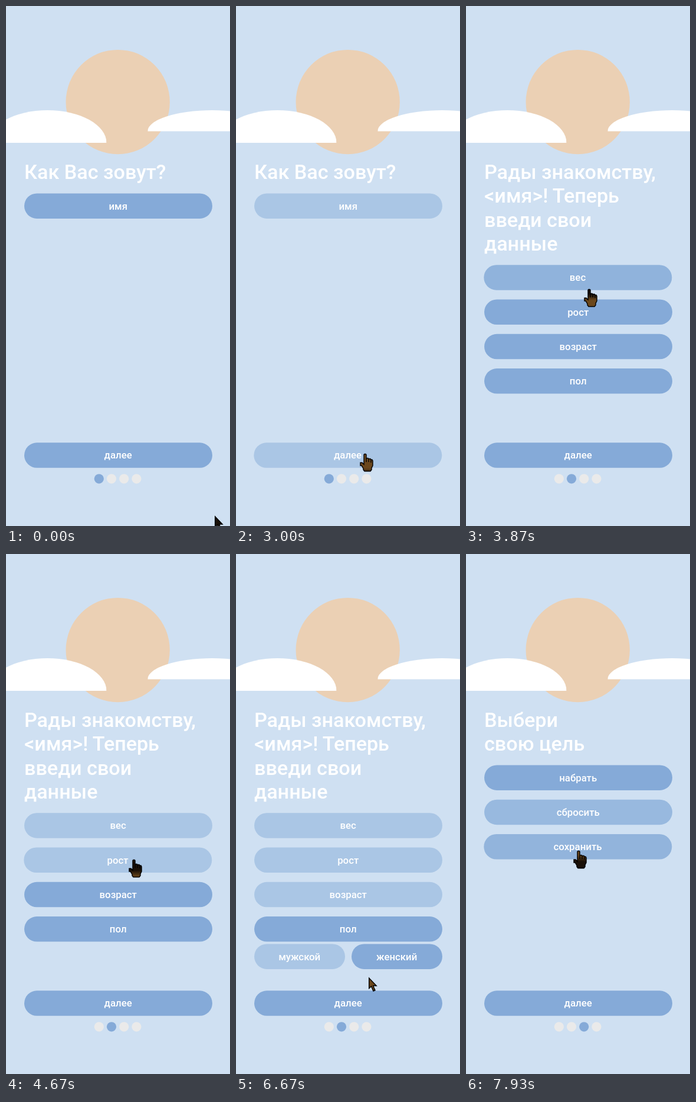
Animation, 380 px wide and 878 px high, one loop 8 s. Source, as an HTML page:

```html
<!DOCTYPE html>
<html lang="ru">
<head>
<meta charset="utf-8">
<style>
html, body { margin: 0; width: 100%; height: 100%; overflow: hidden; background: #cfe0f2; }
svg { display: block; }
text { font: 500 16.8px Roboto, sans-serif; fill: #fff; }
.title { font-size: 34.1px; }
</style>
</head>
<body>
<svg id="stage" width="380" height="878">
  <circle cx="189.7" cy="162.1" r="88.2" fill="#ebd0b4"/>
  <ellipse cx="70.3" cy="231" rx="100.2" ry="55" fill="#fff" clip-path="inset(0 0 50% 0)"/>
  <ellipse cx="350" cy="211.4" rx="109.7" ry="35.3" fill="#fff" clip-path="inset(0 0 50% 0)"/>
</svg>
<script>
const LOOP = 8000, STEP = 1000 / 15, HOLD = 130, HEIGHT = 42.5, ROW = 58.3;
const DARK = [133, 170, 216], LIGHT = [170, 198, 229];
const stage = document.getElementById('stage');

function add(parent, tag, attrs, text) {
  const el = document.createElementNS('http://www.w3.org/2000/svg', tag);
  for (const k in attrs) el.setAttribute(k, attrs[k]);
  if (text) el.textContent = text;
  parent.append(el);
  return el;
}
const set = (el, k, v) => el.setAttribute(k, v);
const clamp = u => Math.min(1, Math.max(0, u));
const smooth = u => u * u * (3 - 2 * u);
const easeOut = (t, start, dur = 300) => 1 - (1 - clamp((t - start) / dur)) ** 1.75;
const mix = (a, b, u) => a + (b - a) * u;

// Values at time t in a list of [time, ...values], resting for `hold` at each
function track(keys, t, hold = 0, ease = u => u) {
  const i = Math.max(1, keys.findIndex(k => k[0] > t));
  const [t0, ...a] = keys[i - 1], [t1, ...b] = keys[i];
  const start = t0 + Math.min(hold, (t1 - t0) / 3);
  const u = ease(clamp((t - start) / (t1 - start)));
  return a.map((v, n) => mix(v, b[n], u));
}

const titles = [
  ['Как Вас зовут?'],
  ['Рады знакомству,', '<имя>! Теперь', 'введи свои', 'данные'],
  ['Выбери', 'свою цель']
];
const pages = titles.map(lines => {
  const g = add(stage, 'g', {});
  lines.forEach((s, n) => add(g, 'text', { class: 'title', x: 31, y: 291.7 + 40.5 * n }, s));
  return g;
});

// `toggles` are the times at which a button turns light, dark, light...
const buttons = [];
function button(label, page, y, toggles = [], x = 31, w = 319) {
  const g = add(stage, 'g', {});
  const rect = add(g, 'rect', { x, y, width: w, height: HEIGHT, rx: HEIGHT / 2 });
  add(g, 'text', { x: x + w / 2 - .3, y: y + 27.1, 'text-anchor': 'middle' }, label);
  buttons.push({ g, rect, page, x, y, w, toggles });
}
const SEX = 4, ALWAYS = 3;
const rows = (page, y, list) => list.forEach(([label, ...toggles], i) =>
  button(label, page, y + ROW * i, toggles));
rows(0, 316.4, [['имя', 1560]]);
rows(1, 437.2, [['вес', 3810], ['рост', 4350], ['возраст', 4750], ['пол', 5250, 5735]]);
button('мужской', SEX, 658.4, [-300], 31, 154);
button('женский', SEX, 658.4, [-300, 6250], 196, 154);
rows(2, 356.4, [['набрать'], ['сбросить', 7450, 7840], ['сохранить', 7870]]);
button('далее', ALWAYS, 737.3, [880, 1230, 2700, 3250, 6700, 7080]);

const dotX = i => 157.8 + 21.2 * i;
const dots = [1, 2, 3, 0].map(i =>
  add(stage, 'circle', { cx: dotX(i), cy: 798.3, r: 8.1, fill: i ? '#eaeaea' : '#85aad8' }));

// Cursor with a dark band drifting over brown
const grad = add(stage, 'linearGradient', { id: 'skin', gradientUnits: 'userSpaceOnUse', x1: 0, x2: 0 });
['#6b471c', '#191008', '#191008', '#6b471c'].forEach((c, i) =>
  add(grad, 'stop', { offset: [0, .3, .7, 1][i], 'stop-color': c }));
const cursor = add(stage, 'g', { stroke: '#000', 'stroke-width': 1.4, fill: 'url(#skin)' });
const arrow = add(cursor, 'path', { d: 'M.7 1V18.5L4.5 15 8 23 11 21.7 7.6 14H13.2Z' });
const hand = add(cursor, 'path', {
  d: 'M-1 1.5L0 .5H2L3 1.5V14V7.5H6L7 8.5V14V8.5H10L11 10V15V10H13L14 12V20L12 24V27L10 29.5H0' +
     'L-2 27V25L-5 20H-7V15H-4L-1 18Z'
});

const path = [
  [0, 354, 861], [200, 173, 484], [500, 173, 484], [1070, 190, 779], [1800, 191, 336],
  [2130, 204, 267], [2950, 218, 756], [3867, 208, 478], [4130, 206, 458], [4670, 216, 516],
  [5067, 225, 570], [5533, 242, 637], [5800, 242, 637], [6230, 258, 680], [6600, 225, 715],
  [6950, 195, 756], [7133, 195, 756], [7500, 190, 432], [7933, 190, 501], [LOOP, 190, 505]
];
const band = [[0, 8], [1800, 32], [3000, 42], [3867, 1], [7133, 42], [LOOP, 24]];

function draw(t) {
  const a = easeOut(t, 3030), b = easeOut(t, 6980), sex = easeOut(t, 5735, 180);
  const alpha = [1 - a, a * (1 - b), b, 1, sex * (1 - b)];
  const [x, y] = track(path, t, HOLD, smooth);
  const pressed = t > 5720 && t < 5880;
  let over = false;

  pages.forEach((g, i) => set(g, 'opacity', alpha[i]));
  for (const btn of buttons) {
    const light = btn.toggles.reduce((sum, s, i) => sum + easeOut(t, s) * (i % 2 ? -1 : 1), 0);
    const inside = !pressed && alpha[btn.page] > .3 &&
      x > btn.x && x < btn.x + btn.w && y > btn.y && y < btn.y + HEIGHT;
    over = over || inside;
    set(btn.g, 'opacity', alpha[btn.page]);
    set(btn.g, 'transform', `translate(${inside ? -.7 : 0} 0)`);
    set(btn.rect, 'fill', `rgb(${DARK.map((d, i) => Math.round(mix(d, LIGHT[i], light)))})`);
  }

  // The active dot trades places with its neighbours
  set(dots[3], 'cx', dotX(a + b));
  set(dots[0], 'cx', dotX(1 - a));
  set(dots[1], 'cx', dotX(2 - b));

  const [c] = track(band, t);
  set(grad, 'y1', c - 18);
  set(grad, 'y2', c + 18);
  set(cursor, 'transform', `translate(${Math.round(x)} ${Math.round(y)})`);
  set(arrow, 'visibility', over ? 'hidden' : 'visible');
  set(hand, 'visibility', over ? 'visible' : 'hidden');
}

function tick() {
  const t = performance.now() % LOOP;
  draw(Math.floor((t + 5) / STEP) * STEP % LOOP);
  requestAnimationFrame(tick);
}
tick();
</script>
</body>
</html>
```
